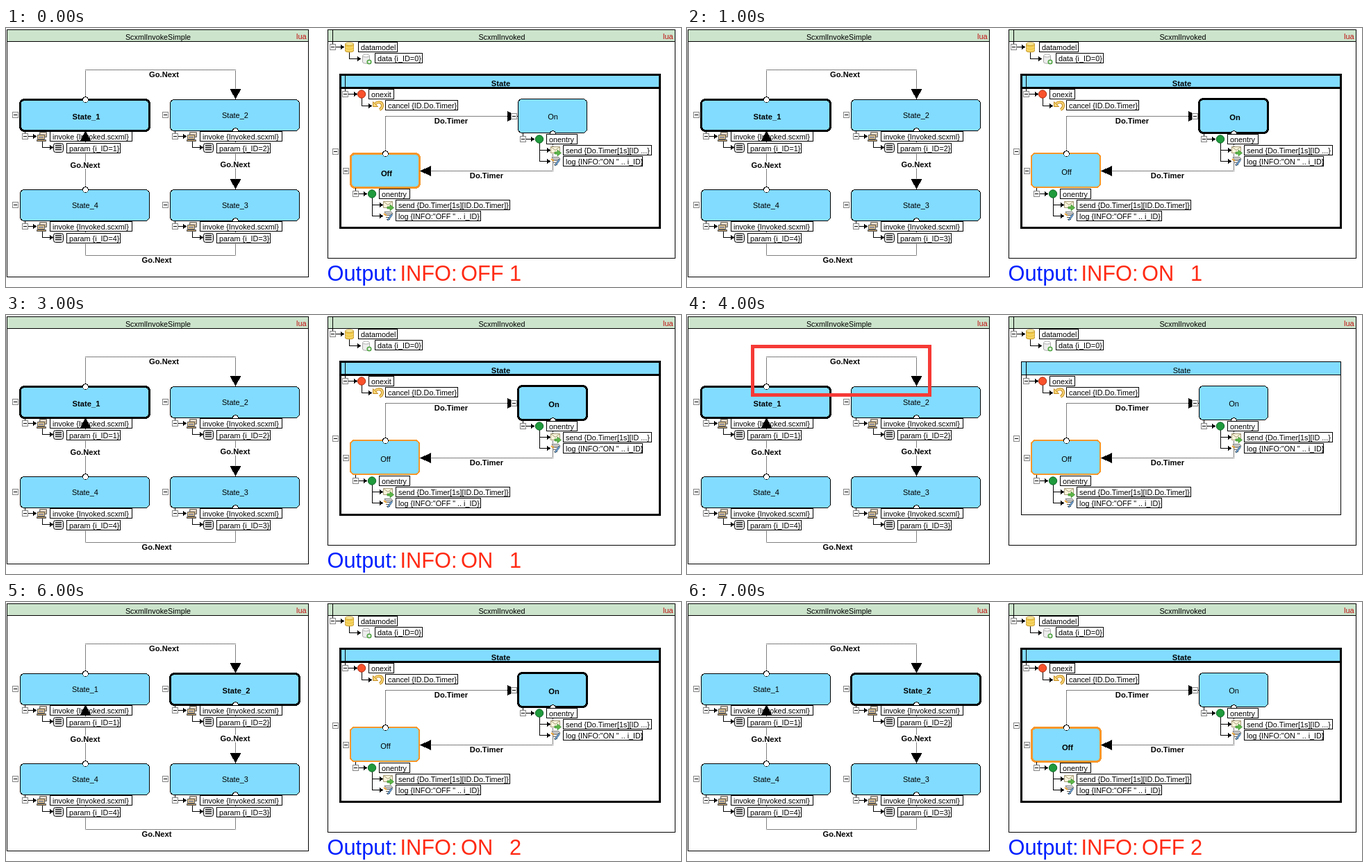
An HTML page that plays this animation: 972 px wide and 374 px high, repeating every 8000 ms.

```html
<!DOCTYPE html>
<html lang="en">
<head>
<meta charset="utf-8">
<title>State machine</title>
<style>
html, body { margin: 0; width: 100%; height: 100%; overflow: hidden; background: #fff; }
svg { display: block; width: 972px; height: 374px; font: 10.8px "Liberation Sans", Arial, sans-serif; shape-rendering: crispEdges; }
.b { font-weight: bold; font-size: 11.2px; }
.out { font-size: 30.8px; }
.icon { shape-rendering: geometricPrecision; }
.wire { fill: none; stroke: #000; stroke-dasharray: 1 1; shape-rendering: geometricPrecision; }
.off, .on, .idle, .run, .one, .two { animation: 8s step-end infinite; }
.off { animation-name: off; }
.on { animation-name: on; }
.idle { animation-name: idle; }
.run { animation-name: run; }
.one { animation-name: one; }
.two { animation-name: two; }
@keyframes off { 0%, 25%, 62.5%, 87.5% { opacity: 1 } 12.5%, 37.5%, 75% { opacity: 0 } }
@keyframes on { 0%, 25%, 50%, 87.5% { opacity: 0 } 12.5%, 37.5%, 75% { opacity: 1 } }
@keyframes idle { 0%, 62.5% { opacity: 0 } 50% { opacity: 1 } }
@keyframes run { 0%, 62.5% { opacity: 1 } 50% { opacity: 0 } }
@keyframes one { 0% { opacity: 1 } 62.5% { opacity: 0 } }
@keyframes two { 0% { opacity: 0 } 62.5% { opacity: 1 } }
</style>
</head>
<body>
<svg id="stage" viewBox="0 0 972 374"></svg>
<script>
const BLUE = '#82dcff', GREEN = '#cce4cc', ORANGE = '#f7962a';

// Odd strokes sit on half pixels, even ones on whole pixels
const rect = (x, y, w, h, { fill = '#fff', stroke = '#000', sw = 1, rx = 0 } = {}) => {
  const o = sw % 2 / 2;
  return `<rect x="${x + o}" y="${y + o}" width="${w}" height="${h}" rx="${rx}" fill="${fill}" stroke="${stroke}" stroke-width="${sw}"/>`;
};
const path = (d, fill = 'none', stroke = '#000', w = 1) =>
  `<path d="${d}" fill="${fill}" stroke="${stroke}" stroke-width="${w}"/>`;
const text = (x, y, s, extra = '') => `<text x="${x}" y="${y}" ${extra}>${s}</text>`;
const mid = (x, y, s, extra = '') => text(x, y, s, `text-anchor="middle" ${extra}`);
const group = (cls, s) => `<g class="${cls}">${s}</g>`;
const wire = d => `<path class="wire" d="${d}"/>`;
const head = d => path(d + 'z', '#000', 'none');
const port = (x, y) => `<circle cx="${x + .5}" cy="${y + .5}" r="4" fill="#fff" stroke="#000"/>`;
const ball = (x, y, fill, edge) =>
  `<circle class="icon" cx="${x}" cy="${y}" r="5.7" fill="${fill}" stroke="${edge}"/>`;
const toggle = (x, y) => rect(x, y, 8, 8, { stroke: '#848484' }) + path(`M${x + 2} ${y + 4.5}h5`);
const label = (x, y, w, s) => rect(x, y, w, 14) + text(x + 4, y + 11.5, s);

// Horizontal arrow ending at x2
const arrow = (x1, x2, y) => path(`M${x1} ${y + .5}H${x2 - 3}`) +
  head(`M${x2} ${y + .5}l-5 -3.5v7`);
// Drop from a parent icon, then an arrow to the child
const branch = (x, y1, y2, x2) => path(`M${x + .5} ${y1}V${y2 + .5}`) + arrow(x, x2, y2);

const icons = {
  invoke: path('M4.5 1.5h10v7h-10z', '#c8b49a', '#666') + path('M6 3.5h7', 'none', '#fff') +
    path('M1.5 5.5h10v6h-10z', '#f0cf90', '#555') + path('M3 7.5h7v2.5h-7z', '#8c8c98', 'none') +
    path('M.5 12.5h13v2h-13z', '#c9a46a', '#555'),
  list: rect(0, 0, 14, 13, { fill: '#e8e8e8', rx: 3 }) + path('M3 3.5h9M3 6.5h9M3 9.5h9', 'none', '#222', 1.4),
  store: path('M1.5 3v10c0 2.500 12 2.500 12 0v-10', '#f0c848', '#c8a040') +
    '<ellipse cx="7.5" cy="3" rx="6" ry="2" fill="#fff0a0" stroke="#c8a040"/>' +
    path('M1.5 7c1 2.500 11 2.500 12 0M1.5 10.5c1 2.500 11 2.500 12 0', 'none', '#fbe48a'),
  data: path('M1.5 3v9c0 3 10 3 10 0v-9', '#eee', '#aaa') +
    '<ellipse cx="6.5" cy="3" rx="5" ry="2" fill="#fff" stroke="#aaa"/>' +
    '<circle cx="11" cy="12" r="3.6" fill="#58a84c"/>' + path('M9 12h4M11 10v4', 'none', '#fff', 1.3),
  undo: path('M3 6C8 1 14 3 14 8c0 3-2 5-4 6', 'none', '#c48a20', 4) +
    path('M3 6C8 1 14 3 14 8c0 3-2 5-4 6', 'none', '#f8d878', 2) +
    path('M.5 2.5v7h7z', '#f8d878', '#c48a20'),
  send: path('M.5 2.5h13v9h-13z', '#f8f4dc', '#a89c78') + path('M.5 2.5l6.5 5 6.5-5', 'none', '#a89c78') +
    path('M6 10h4v-3l5.5 4.5-5.5 4.5v-3h-4z', '#5cb648', '#3a8a30', .7),
  log: path('M2 1.5h10l2 3h-10z', '#ddd', '#777') + path('M3 6.5h9M4 9.5h7M5 12.5h5', 'none', '#555') +
    path('M13.5 6l-5 7-2 1 .5-2.5 5-7z', '#6ea0dc', '#356', .7) + path('M1 4l4 3', 'none', '#e8a030', 2)
};
const icon = (name, x, y) => `<g class="icon" transform="translate(${x} ${y})">${icons[name]}</g>`;

const panel = (x, y, w, h, name, lua) => rect(x, y, w, h) + rect(x, y, w, 17, { fill: GREEN }) +
  mid(x + w / 2 + 1, 17, name) + text(lua, 16, 'lua', 'fill="#c01010" font-size="11"');

function box(x, y, w, h, name, cls, { dy = 4.5, edge = '#000', thin = 1 } = {}) {
  const cx = x + w / 2, cy = y + h / 2 + dy;
  const shape = sw => rect(x, y, w, h, { fill: BLUE, stroke: edge, sw, rx: 6 });
  return shape(thin) + mid(cx + 1, cy, name, 'font-size="11"') +
    (cls ? group(cls, shape(3) + mid(cx + 2.5, cy + 1.5, name, 'class="b"')) : '');
}

// Invoke and param rows hanging below a left-hand state
const invoke = (x, y, id) =>
  path(`M${x + 7.5} ${y + 45}v5`) + toggle(x + 3, y + 49) + arrow(x + 12, x + 24, y + 53) +
  branch(x + 32, y + 60, y + 69, x + 48) + icon('invoke', x + 24, y + 46) +
  label(x + 43, y + 46, 118, 'invoke {Invoked.scxml}') +
  icon('list', x + 48, y + 63) + label(x + 67, y + 63, 77, `param {i_ID=${id}}`) +
  toggle(x - 11, y + 18);

// Entry handler rows hanging below an inner state
const entry = (x, y, wSend, send, wLog, log) =>
  path(`M${x + 4.5} ${y - 4}v5`) + toggle(x, y) + arrow(x + 9, x + 21, y + 4) +
  branch(x + 28, y + 10, y + 20, x + 44) + branch(x + 28, y + 10, y + 36, x + 44) +
  ball(x + 28, y + 4.5, '#1f9a3c', '#0c6424') + label(x + 38, y - 3, 44, 'onentry') +
  icon('send', x + 44, y + 13) + label(x + 62, y + 13, wSend, send) +
  icon('log', x + 44, y + 29) + label(x + 62, y + 29, wLog, log);

const event = (x, y, s) => mid(x, y, s,
  'class="b" stroke="#fff" stroke-width="3" paint-order="stroke"');

const left = panel(1, 2, 434, 357, 'ScxmlInvokeSimple', 418) +
  box(20, 103, 186, 45, 'State_1', 'one') + box(236, 103, 186, 45, 'State_2', 'two') +
  box(236, 233, 186, 45, 'State_3') + box(20, 233, 186, 45, 'State_4') +
  wire('M114.5 99V60.5H330.5V90') + wire('M330.5 152V220') +
  wire('M330.5 282V328.5H114.5V279') + wire('M114.5 229V164') +
  port(114, 103) + port(330, 148) + port(330, 278) + port(114, 233) +
  invoke(20, 103, 1) + invoke(236, 103, 2) + invoke(236, 233, 3) + invoke(20, 233, 4) +
  head('M330.5 103l-8 -15h16') + head('M330.5 233l-8 -15h16') + head('M114.5 148l-8 16h16') +
  event(227.5, 71, 'Go.Next') + event(330, 201, 'Go.Next') +
  event(217, 339, 'Go.Next') + event(114, 202, 'Go.Next');

const frame = (sw, style) => rect(481, 67, 460, 221, { sw }) +
  rect(481, 67, 460, 19, { fill: BLUE, sw }) + mid(712.5, 84, 'State', style);

const right = panel(463, 2, 500, 330, 'ScxmlInvoked', 946) +
  path('M470.5 2V24') + toggle(466, 23) + arrow(475, 487, 27) + branch(494, 35, 44, 511) +
  icon('store', 487, 20) + label(507, 20, 56, 'datamodel') +
  icon('data', 512, 37) + label(531, 36, 68, 'data {i_ID=0}') +
  frame(1, 'font-size="11"') + group('run', frame(3, 'class="b"')) +
  path('M488.5 68V91') + toggle(484, 91) + arrow(493, 506, 95) + branch(512, 101, 112, 527) +
  ball(512, 95.5, '#f8522c', '#a82a10') + label(522, 88, 36, 'onexit') +
  icon('undo', 528, 104) + label(546, 104, 104, 'cancel {ID.Do.Timer}') +
  toggle(470, 174) +
  box(496, 181, 99, 49, 'Off', 'off', { dy: 6.5, edge: ORANGE, thin: 2 }) +
  box(737, 102, 99, 49, 'On', 'on', { dy: 5 }) +
  wire('M546.5 177V127.5H723') + wire('M787.5 156V206.5H611') +
  head('M737 127.5l-15 -7.5v15') + head('M596 206.5l16 -7.5v15') +
  port(546, 181) + port(787, 152) + toggle(727, 123) + toggle(485, 202) +
  entry(740, 156, 127, 'send {Do.Timer[1s][ID ...}', 114, 'log {INFO:"ON " .. i_ID}') +
  entry(499, 235, 164, 'send {Do.Timer[1s][ID.Do.Timer]}', 122, 'log {INFO:"OFF " .. i_ID}') +
  event(641, 138, 'Do.Timer') + event(692, 217, 'Do.Timer');

const red = (cls, x, s) => group(cls, text(x, 365, s, 'fill="#ff2a14"'));
const output = group('run out',
  text(462.5, 365, 'Output:', 'fill="#0020ff"') + red('', 567.5, 'INFO:') +
  red('off', 655, 'OFF') + red('on', 655, 'ON') + red('one', 725, '1') + red('two', 725, '2'));

const marker = group('idle', rect(94, 45, 255, 70, { fill: 'none', stroke: '#f63a36', sw: 5 }));

document.getElementById('stage').innerHTML = left + right + output + marker;
</script>
</body>
</html>
```
